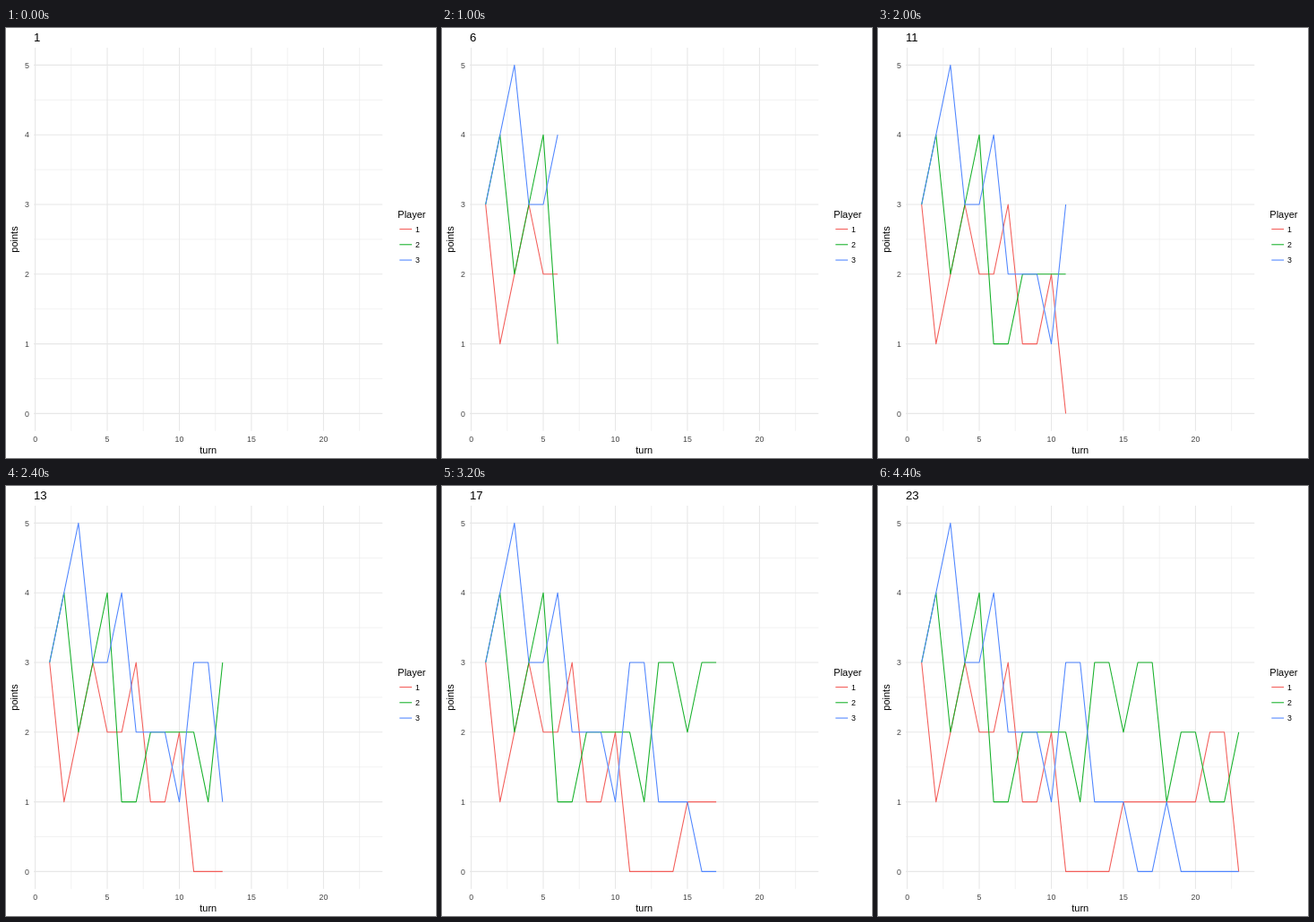
An HTML page for the animation above (4.6 s loop, 480 by 480 pixels).

```html
<!DOCTYPE html>
<html lang="en">
<head>
<meta charset="utf-8">
<title>Points per turn</title>
<style>
  html, body { margin: 0; width: 100%; height: 100%; overflow: hidden; background: #fff; }
  svg { display: block; width: 480px; height: 480px; font-family: "Liberation Sans", Arial, sans-serif; }
  .grid { stroke: #e7e7e7; stroke-width: 1.07; }
  .minor { stroke-width: 0.53; }
  .line { fill: none; stroke-width: 1.07; stroke-linejoin: round; }
  .tick { font-size: 8.8px; fill: #444; }
  .label { font-size: 11px; }
  .key { font-size: 8.8px; }
  .title { font-size: 13.2px; }
</style>
</head>
<body>
<svg id="chart" viewBox="0 0 480 480"></svg>
<script>
const STEP = 200, TURNS = 23;
const LEFT = 31, RIGHT = 420.3, TOP = 22, BOTTOM = 449.8;
const players = [
  { color: '#f35e5a', points: '31232231120000111111220' },
  { color: '#17b12b', points: '34234112222133233122112' },
  { color: '#5086ff', points: '34533422213311100100000' }
];

const x = turn => 32.6 + turn * 16.09;
const y = points => 430.4 - points * 77.8;
const chart = document.getElementById('chart');

function add(tag, attributes, content = '') {
  const node = document.createElementNS('http://www.w3.org/2000/svg', tag);
  for (const name in attributes) node.setAttribute(name, attributes[name]);
  node.textContent = content;
  return chart.appendChild(node);
}

const text = (content, x, y, kind, anchor = 'start', more = {}) =>
  add('text', { x, y, class: kind, 'text-anchor': anchor, ...more }, content);
const gridX = (turn, kind) =>
  add('line', { x1: x(turn), x2: x(turn), y1: TOP, y2: BOTTOM, class: kind });
const gridY = (points, kind) =>
  add('line', { x1: LEFT, x2: RIGHT, y1: y(points), y2: y(points), class: kind });

for (let p = 0.5; p < 5; p++) gridY(p, 'grid minor');
for (let t = 2.5; t < 24; t += 5) gridX(t, 'grid minor');
for (let p = 0; p <= 5; p++) {
  gridY(p, 'grid');
  text(p, 26, y(p) + 3.2, 'tick', 'end');
}
for (let t = 0; t <= 20; t += 5) {
  gridX(t, 'grid');
  text(t, x(t), 462, 'tick', 'middle');
}

text('turn', 225.7, 475, 'label', 'middle');
text('points', 0, 0, 'label', 'middle', { transform: 'translate(13 236) rotate(-90)' });
text('Player', 437.3, 212, 'label');

const lines = players.map(({ color }, i) => {
  const keyY = 224.5 + i * 17.28;
  add('line', { x1: 439.3, x2: 453.1, y1: keyY, y2: keyY, class: 'line', stroke: color });
  text(i + 1, 457, keyY + 3.2, 'key');
  return add('polyline', { class: 'line', stroke: color });
});
const title = text('', 31, 15, 'title');

let shown = 0;
function draw() {
  const turn = Math.floor(performance.now() / STEP) % TURNS + 1;
  if (turn !== shown) {
    shown = turn;
    title.textContent = turn;
    players.forEach(({ points }, i) => lines[i].setAttribute('points',
      [...points.slice(0, turn)].map((p, t) => `${x(t + 1)},${y(p)}`).join(' ')));
  }
  requestAnimationFrame(draw);
}
draw();
</script>
</body>
</html>
```
